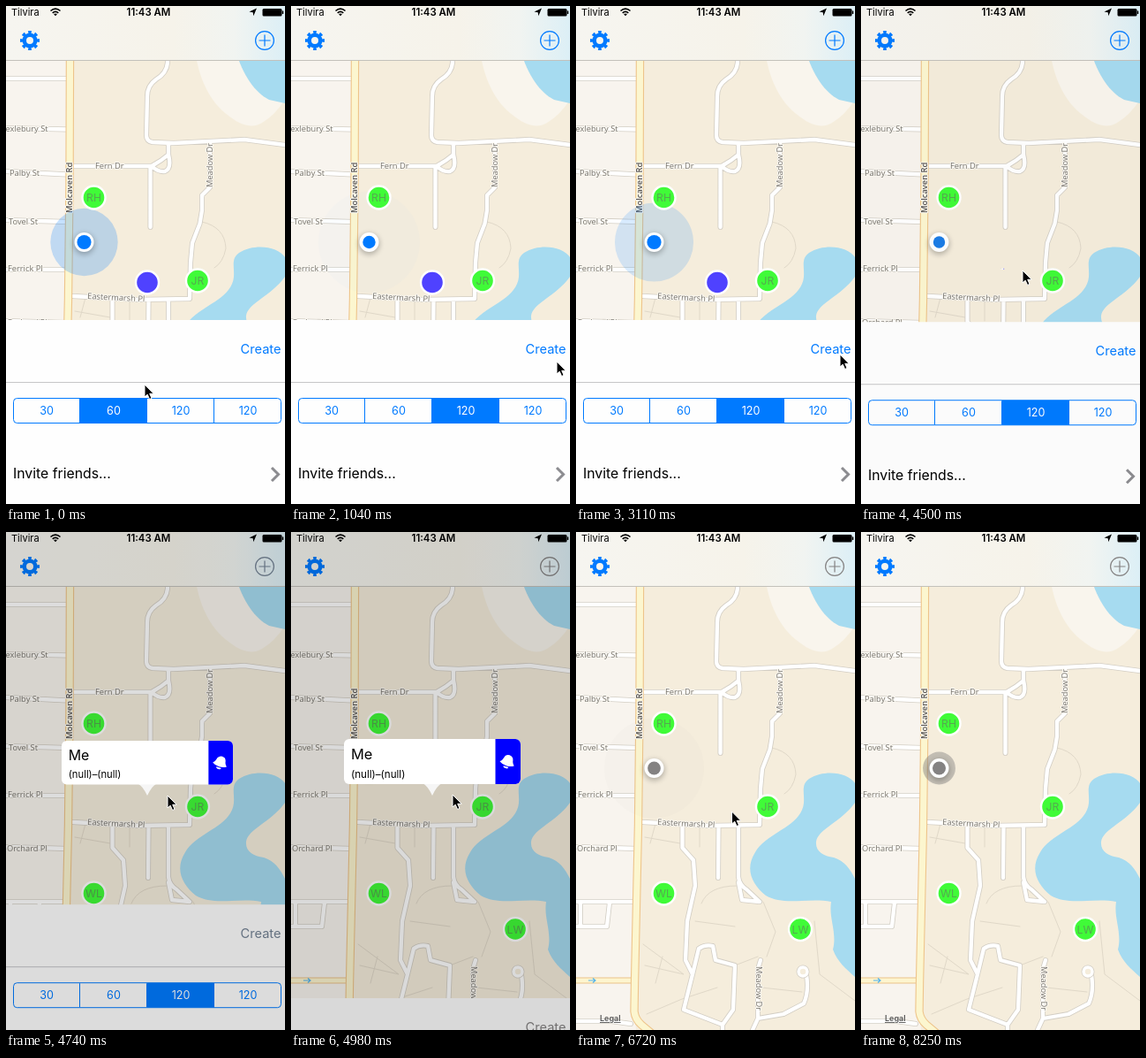
Recreate the animation shown at these times as an HTML page. Size 316 by 563 pixels, loop 8.35 s.

```html
<!DOCTYPE html>
<html lang="en">
<head>
<meta charset="utf-8">
<title>Map picker</title>
<style>
  html, body { margin: 0; width: 100%; height: 100%; overflow: hidden; background: #fff; }
  svg { display: block; width: 316px; height: 563px; font-family: Inter, "Liberation Sans", sans-serif; }
  #labels text { font: 9.3px "Open Sans", "Noto Sans", sans-serif; fill: #77746f; stroke: #fbf8f1; stroke-width: 2px; paint-order: stroke; stroke-linejoin: round; }
  #labels .major { font-weight: 600; fill: #55524e; }
  #roads path, #trails path { fill: none; stroke-linecap: round; stroke-linejoin: round; }
  #segments text, .pin text { text-anchor: middle; }
  .pin text { font-size: 12.2px; fill: #55a850; }
</style>
</head>
<body>
<svg viewBox="0 0 316 563">
  <defs>
    <linearGradient id="bar">
      <stop offset="0" stop-color="#f6f5f0"/><stop offset=".6" stop-color="#f6f3ea"/>
      <stop offset=".82" stop-color="#f1f4f1"/><stop offset="1" stop-color="#dceff6"/>
    </linearGradient>
    <filter id="soft" x="-50%" y="-50%" width="200%" height="200%"><feGaussianBlur stdDeviation="3"/></filter>
    <clipPath id="segClip"><rect x="8.5" y="443.5" width="303" height="28" rx="4"/></clipPath>
  </defs>

  <rect width="316" height="563" fill="#f5eddc"/>
  <path d="M0 0H72V400L66 520L68 563H0Z" fill="#f8f4ee"/>
  <path d="M214 50C218 80 230 108 252 124Q274 142 290 132Q304 124 316 106V50Z" fill="#f9f5ed"/>
  <g fill="#a6dbf0">
    <path d="M260 50C268 78 282 98 298 106L316 110V50Z"/>
    <path d="M316 284C308 272 282 268 264 279C251 288 264 303 254 318C244 335 214 343 203 362C191 381 199 398 215 411C235 423 264 413 289 418C286 437 296 452 291 472C296 486 306 494 316 503V392C310 380 304 372 292 368C280 366 271 361 272 350C274 336 300 328 316 306Z"/>
  </g>
  <g id="trails" stroke="#e0d8c8" stroke-width="1"></g>
  <g id="roads"></g>
  <path d="M14 507h8m-3-2.5l3 2.5l-3 2.5" fill="none" stroke="#55b4ec" stroke-width="1.2"/>
  <g id="labels"></g>

  <circle id="ring" cx="88.5" cy="267"/>
  <circle cx="88.5" cy="269" r="11.5" fill="#000" opacity=".28" filter="url(#soft)"/>
  <circle cx="88.5" cy="267" r="11" fill="#fff"/>
  <circle id="dot" cx="88.5" cy="267"/>
  <g id="pins"></g>
  <text x="27" y="553" font-size="9" font-weight="600" fill="#555" text-decoration="underline">Legal</text>

  <rect width="316" height="61" fill="url(#bar)"/>
  <path d="M0 61.5H316" stroke="#c3c1bb"/>
  <text x="6" y="11" font-size="11">Tilvira</text>
  <text x="161.5" y="11" font-size="11.4" font-weight="600" text-anchor="middle">11:43 AM</text>
  <g fill="none" stroke="#000" stroke-width="1.6">
    <path d="M50.5 5.5Q56 .8 61.5 5.5M52.7 7.8Q56 5 59.3 7.8"/>
    <path d="M54.5 9L56 11L57.5 9Z" fill="#000" stroke-width=".6"/>
  </g>
  <path d="M284 2.5L275.5 6.5L279.7 7.2L280.3 11.3Z"/>
  <rect x="290.5" y="3" width="22" height="8.5" rx="1.5"/>
  <path d="M313.5 5.5v3.5" stroke="#000" stroke-width="1.5"/>
  <g fill="none" stroke="#007aff">
    <circle cx="27" cy="39" r="6.3" stroke-width="4.6"/>
    <circle cx="27" cy="39" r="9.4" stroke-width="3.2" pathLength="16" stroke-dasharray="1 1" stroke-dashoffset=".5"/>
  </g>
  <g id="plus" fill="none" stroke-width="1.2">
    <circle cx="293" cy="39" r="10.4"/><path d="M286.5 39h13M293 32.5v13"/>
  </g>

  <g id="sheet">
    <rect y="355" width="316" height="420" fill="#fefefe"/>
    <text id="create" x="311.5" y="393" font-size="14.6" text-anchor="end">Create</text>
    <path d="M0 425.5H316" stroke="#c6c6c8"/>
    <g id="segments" font-size="12.6">
      <rect id="chosen" y="443.5" width="76" height="28" fill="#007aff" clip-path="url(#segClip)"/>
      <path d="M83.5 444v27M159.5 444v27M235.5 444v27" stroke="#007aff"/>
      <rect x="8.5" y="443.5" width="303" height="28" rx="4" fill="none" stroke="#007aff"/>
    </g>
    <text x="8" y="534" font-size="15.8">Invite friends...</text>
    <path d="M301 522l7.5 7.5l-7.5 7.5" fill="none" stroke="#8c8c90" stroke-width="3"/>
  </g>

  <rect id="dim" width="316" height="563"/>

  <g id="callout">
    <path d="M149 284Q155 287 160 298Q165 287 171 284Z" fill="#f6f6f6"/>
    <rect x="60" y="234" width="200" height="51" rx="6" fill="#fff"/>
    <path d="M231.5 234H254a6 6 0 0 1 6 6V279a6 6 0 0 1 -6 6H231.5Z" fill="#00f"/>
    <text x="68" y="257" font-size="16.4">Me</text>
    <text x="68" y="277.5" font-size="11.6">(null)–(null)</text>
    <g transform="translate(245.5 259) rotate(18)" fill="#fff">
      <path d="M-8.5 3Q-6 1 -5.5 -2Q-4.500 -7 0 -7Q4.500 -7 5.500 -2Q6 1 8.500 3Q5 5.500 0 5.500T-8.500 3Z"/>
      <path d="M-3 6.500h6a3 2 0 0 1 -6 0Z"/>
    </g>
  </g>

  <path id="cursor" d="M0 0V14L3.2 11.2L5.6 16.5L8 15.4L5.7 10.3H10.2Z" stroke="#fff" stroke-linejoin="round"/>
</svg>
<script>
const LOOP = 8350, PULSE = 2900;
const $ = id => document.getElementById(id);

function add(parent, tag, attrs, text) {
  const el = document.createElementNS('http://www.w3.org/2000/svg', tag);
  for (const k in attrs) el.setAttribute(k, attrs[k]);
  if (text) el.textContent = text;
  return parent.appendChild(el);
}

// Map
const minor = [
  'M0 82H70M0 138L70 139.5M0 187L70 190.5M0 242L70 244M0 298H70M0 356L70 358M0 418H68',
  'M0 446H35L38 419M5 419V446M0 553H40L62 556',
  'M76 181H165Q172 188 180 187Q188 184 184 168V156M165 181Q176 175 184 168M163.5 182V250',
  'M183 55V64Q182 76 170 83Q160 90 160 102L159 146Q159 153 166 154L190 155L270 151L316 157',
  'M231 155V205L222 214V231L219.5 246L211 268L209 290L208 331M76 328L150 332L208 331',
  'M120.5 332V357L133 371L135 400L126 440L124 484L132 500M161.5 333L161 391M184 332V390Q185 399 193 404L208 418L188 416L184 396',
  'M132 500L139 471Q146 466 155 468L158 484L180 490L178 540L166 557L122 540Z',
  'M209 484L206 494V550L235 545L258 533Q264 520 261 501M206 550L200 563M166 557V563'
].join('');
const side = 'M0 507H66';
const main = 'M72.5 50L72 200L70.5 330L68.5 420L66.5 510L66 542Q67 551 74 557L86 567';
const layers = [
  [minor, '#d3cec4', 6], [minor, '#fff', 4.3],
  [side, '#ecc48a', 7], [side, '#fdf5cf', 5],
  [main, '#eec48a', 9.4], [main, '#fcf6cf', 7.2]
];
for (const [d, stroke, w] of layers) add($('roads'), 'path', { d, stroke, 'stroke-width': w });
for (const [stroke, w] of [['#d3cec4', 5], ['#fff', 3.4]])
  add($('roads'), 'circle', { cx: 257, cy: 497, r: 5, fill: '#f5eddc', stroke, 'stroke-width': w });
add($('trails'), 'path', { d: 'M78 345L118 352M90 330L84 352M140 332V356M222 244Q248 250 249 274Q246 290 236 296M76 466L122 500L78 490M98 480L90 510M135 440L180 446M182 400Q150 400 142 420M212 418L226 452L216 480M180 490L206 480M210 515L256 520M270 440L276 500L316 530M80 545L120 528L160 515' });

const names = [
  [-9, 141.5, 'Wexlebury St'], [4, 192, 'Palby St'], [3, 246.5, 'Tovel St'],
  [2, 300, 'Ferrick Pl'], [1, 360.5, 'Orchard Pl'], [101, 183.5, 'Fern Dr'],
  [92, 331, 'Eastermarsh Pl', 3], [233.5, 205, 'Meadow Dr', -90],
  [204, 491, 'Meadow Dr', 90], [74.5, 234, 'Molcaven Rd', -90, 'major']
];
for (const [x, y, name, turn = 0, cls = ''] of names)
  add($('labels'), 'text', { transform: `translate(${x} ${y}) rotate(${turn})`, class: cls }, name);

function pin(x, y, fill, initials) {
  const g = add($('pins'), 'g', { class: 'pin', transform: `translate(${x} ${y})` });
  add(g, 'circle', { r: 13, fill, stroke: '#fff', 'stroke-width': 2.4 });
  if (initials) add(g, 'text', { y: 4.5 }, initials);
  return g;
}
const green = '#40fb38';
pin(99.5, 216.5, green, 'RH');
pin(217, 310.5, green, 'JR');
pin(99.5, 408.5, green, 'WL');
pin(254, 449, green, 'LW');
const mePin = pin(160, 312.5, '#4f42ff');

const segs = ['30', '60', '120', '120'].map((s, i) =>
  add($('segments'), 'text', { x: 46 + 76 * i, y: 462 }, s));

// Timing
const clamp = v => Math.min(1, Math.max(0, v));
const span = (t, a, b) => clamp((t - a) / (b - a));

function bezier(x1, y1, x2, y2) {
  const at = (p, q, s) => 3 * p * s * (1 - s) ** 2 + 3 * q * s * s * (1 - s) + s ** 3;
  return x => {
    let lo = 0, hi = 1;
    for (let i = 0; i < 24; i++) {
      const mid = (lo + hi) / 2;
      if (at(x1, x2, mid) < x) lo = mid; else hi = mid;
    }
    return at(y1, y2, lo);
  };
}
const ease = bezier(.25, .1, .25, 1), inOut = bezier(.42, 0, .58, 1);

// Rows are [time, ...values]
function track(rows, t) {
  const i = rows.findIndex(r => r[0] > t);
  if (i < 0) return rows[rows.length - 1].slice(1);
  const a = rows[i - 1], b = rows[i], k = inOut(span(t, a[0], b[0]));
  return a.slice(1).map((v, n) => v + (b[n + 1] - v) * k);
}
const pointer = [
  [0, 157, 428], [300, 195, 455], [600, 200, 456], [900, 290, 436], [1040, 301, 402],
  [1750, 300, 398], [2000, 299, 394], [3600, 299, 394], [4180, 165, 309], [4360, 168, 306],
  [4500, 183, 299], [4980, 183, 297], [5400, 184, 299], [5900, 176.5, 316], [6900, 176.5, 316],
  [7540, 274, 570]
];
const pop = [[0, 0], [4490, .01], [4640, 1.08], [4740, .97], [4820, 1]];

// Blue accent fading to the disabled gray
function accent(k) {
  return `rgb(${[[0, 132], [122, 130], [255, 130]].map(([a, b]) => Math.round(a + (b - a) * k))})`;
}

function render(t) {
  const tint = accent(span(t, 4430, 4780));
  const shown = 1 - span(t, 6310, 6540);

  const u = clamp(((t + 1014) % PULSE) / 2750);
  $('ring').setAttribute('r', 60 * ease(u));
  $('ring').setAttribute('fill', tint);
  $('ring').setAttribute('fill-opacity', Math.min(.5, .9 * (1 - u) ** 3));
  $('dot').setAttribute('r', 7.4 + .7 * Math.cos((t - 200) / PULSE * 2 * Math.PI));
  $('dot').setAttribute('fill', tint);
  const action = accent(span(t, 4500, 4780));
  $('plus').setAttribute('stroke', action);
  $('create').setAttribute('fill', action);
  mePin.setAttribute('visibility', t < 4440 ? 'visible' : 'hidden');

  const picked = t < 450 ? 1 : 2;
  $('chosen').setAttribute('x', 8 + 76 * picked);
  segs.forEach((s, i) => s.setAttribute('fill', i === picked ? '#fff' : '#007aff'));

  $('sheet').setAttribute('transform', `translate(0 ${210 * inOut(span(t, 4445, 5205))})`);
  $('dim').setAttribute('opacity', .145 * inOut(span(t, 4420, 4820)) * shown);

  const [scale] = track(pop, t);
  $('callout').setAttribute('transform', `translate(160 298) scale(${t < 4490 ? 0 : scale}) translate(-160 -298)`);
  $('callout').setAttribute('opacity', shown);

  $('cursor').setAttribute('transform', `translate(${track(pointer, t)})`);
}

const start = performance.now();
function tick() {
  render((performance.now() - start) % LOOP);
  requestAnimationFrame(tick);
}
tick();
</script>
</body>
</html>
```
